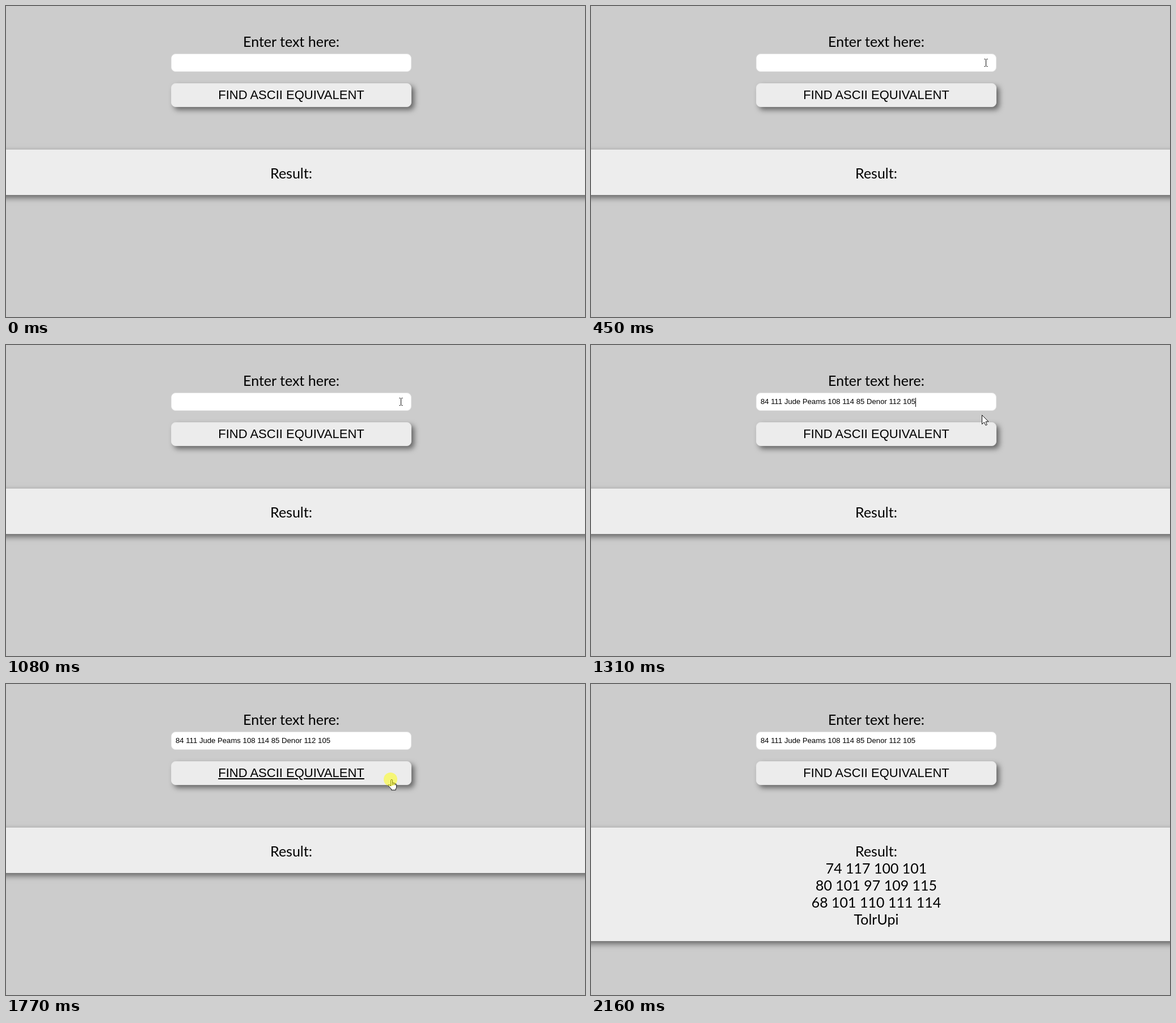
These frames come from a looping animation (1021x548 px, 3.25 s). An HTML page:

```html
<!DOCTYPE html>
<html lang="en">
<head>
<meta charset="utf-8">
<title>ASCII equivalent</title>
<style>
html, body { margin: 0; width: 100%; height: 100%; overflow: hidden; }
body { position: relative; background: #ccc; color: #000; font: 25px/30px Lato, sans-serif; text-align: center; }
body > * { position: absolute; box-sizing: border-box; }
#label { left: 0; width: 1006px; top: 47px; }
#field, #button { left: 291px; width: 424px; border-radius: 8px; font-family: "Liberation Sans", Arial, sans-serif; white-space: pre; }
#field { top: 84px; height: 32px; padding-left: 7px; border: 1px solid #e5e5e5; background: #fff; font-size: 13.15px; line-height: 30px; text-align: left; }
#caret { display: inline-block; width: 1px; height: 16px; margin-right: -1px; background: #000; vertical-align: middle; }
#button { top: 136px; height: 42px; border: 1px solid #e4e4e4; background: #ececec; font-size: 22px; line-height: 40px; }
#result { left: -60px; width: 1126px; top: 252px; padding: 26px 0 24px; border-top: 1px solid #b8b8b8; background: #ededed; white-space: pre; }
#button, #result { box-shadow: 5px 5px 10px #666; }
svg { left: 0; top: 0; }
</style>
</head>
<body>
<div id="label">Enter text here:</div>
<div id="field"><span id="typed"></span><span id="caret"></span></div>
<div id="button">FIND ASCII EQUIVALENT</div>
<div id="result"></div>
<svg width="1021" height="548">
  <g id="pointer" fill="#fff" stroke="#111" stroke-linejoin="round">
    <path id="arrow" d="M.5 .5V16.5L4.3 13L7 18.5L9.4 17.5L7 12H12Z"/>
    <path id="beam" fill="none" d="M-1.5 -5.5H.5M2.5 -5.5H4.5M1.5 -5V7M-1.5 7.5H.5M2.5 7.5H4.5"/>
    <path id="hand" d="M.7 10.5V1.8a1.4 1.4 0 0 1 2.8 0V7.2V6.4q1.5-1.2 2.6.1v1.2V7q1.5-.9 2.5.3v1.2V8q1.6-.5 2 1.2v4.3q0 2-1.4 3.4v2H1.5v-2Q-1 15-3.8 11.2q-.7-1.7.9-1.7Q-1 9.6.7 12Z M3.5 7v3M6.1 7.5v2.6M8.6 8.2v2.2"/>
    <circle id="click" r="12" fill="#ff0" fill-opacity=".5" stroke="none"/>
  </g>
</svg>
<script>
const LOOP = 3250;
const TICKS = [0, 70, 150, 220, 300, 380, 450, 530, 620, 1080, 1160, 1310, 1380,
  1460, 1540, 1620, 1700, 1770, 1850, 2000, 2080, 2160];
const INPUT = "80 111 Jude Peams 108 114 85 Denor 112 105".replace("80", "84");
const el = id => document.getElementById(id);
const codes = word => [...word].map(c => c.charCodeAt(0)).join(" ");
const ANSWER = [..."Jude Peams Denor".split(" ").map(codes), "TolrUpi"].join("\n");

const FIELD = [695, 99], BUTTON = [678, 168];
const easeOut = u => 1 - (1 - u) ** 2;
const easeIn = u => u * u;
const between = (t, a, b) => t >= a && t < b;
const show = (id, on) => el(id).style.display = on ? "" : "none";

function glide(t, start, end, from, to, ease) {
  const u = ease(Math.min(1, Math.max(0, (t - start) / (end - start))));
  return from.map((v, i) => Math.round(v + (to[i] - v) * u));
}

function pointerAt(t) {
  if (t < 1235) return glide(t, 70, 450, [873, 371], FIELD, easeOut);
  if (t < 1925) return glide(t, 1235, 1620, FIELD, BUTTON, easeOut);
  return glide(t, 1925, 2080, BUTTON, [994, 381], easeIn);
}

function draw(now) {
  const time = now % LOOP;
  const t = TICKS.findLast(tick => tick <= time);
  const [x, y] = pointerAt(t);
  const visible = between(t, 70, 2160);
  const inside = (top, bottom) => visible && between(x, 291, 715) && between(y, top, bottom);
  const onField = inside(84, 116), onButton = inside(136, 178);

  el("pointer").setAttribute("transform", `translate(${x} ${y})`);
  show("pointer", visible);
  show("beam", onField);
  show("hand", onButton);
  show("arrow", !onField && !onButton);
  show("click", between(t, 530, 620) || between(t, 1770, 1850));
  el("button").style.textDecoration = onButton ? "underline" : "none";

  el("typed").textContent = t >= 1160 ? INPUT : "";
  show("caret", between(t, 530, 1080) || between(t, 1160, 1700));
  el("result").textContent = "Result:" + (t >= 1850 ? "\n" + ANSWER : "");
  requestAnimationFrame(draw);
}
draw(performance.now());
</script>
</body>
</html>
```
